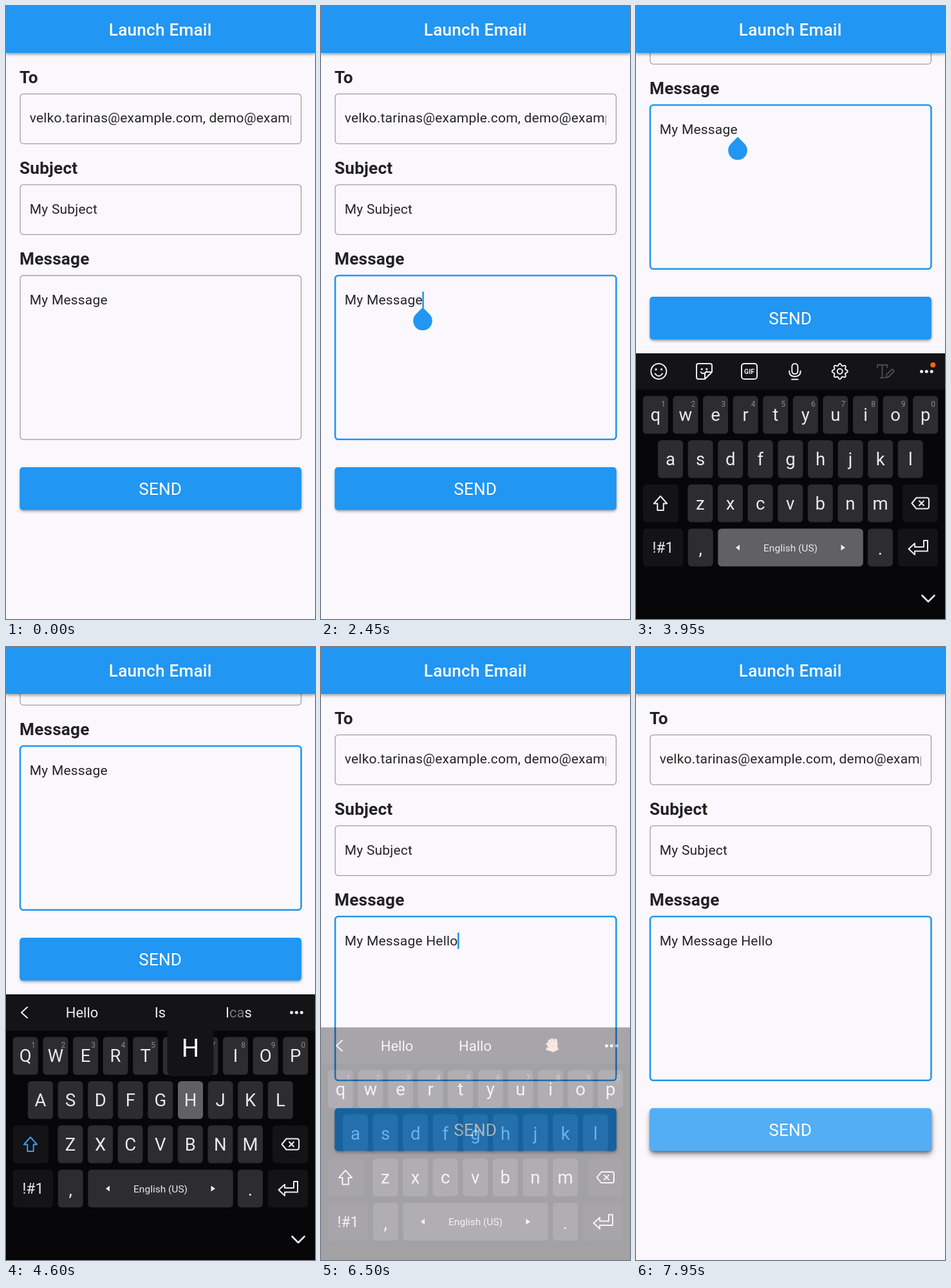
Animation of 480x953 px, one loop 8000 ms. Source, as an HTML page:

```html
<!DOCTYPE html>
<html lang="en">
<head>
<meta charset="utf-8">
<title>Launch Email</title>
<style>
  html, body { margin: 0; width: 100%; height: 100%; overflow: hidden; background: #faf8fc; }
  svg { display: block; width: 100%; height: 100%; font-family: Roboto, sans-serif; }
  text { white-space: pre; }
  .label { font-size: 26.2px; font-weight: 700; letter-spacing: .2px; fill: #222124; }
  .input { font-size: 21px; letter-spacing: .2px; fill: #252427; }
  .box { fill: none; stroke: #9f9da1; stroke-width: 1.3; }
  .icon { fill: none; stroke: #eee; stroke-width: 2; stroke-linecap: round; stroke-linejoin: round; }
  .solid { fill: #eee; stroke: none; }
  .mid { text-anchor: middle; }
</style>
</head>
<body>
<svg viewBox="0 0 480 953" preserveAspectRatio="none">
  <defs>
    <clipPath id="inputClip"><rect x="36" y="140" width="407" height="70"/></clipPath>
    <filter id="soft" x="-20%" y="-40%" width="140%" height="180%"><feGaussianBlur stdDeviation="2"/></filter>
    <filter id="softer" x="-20%" y="-60%" width="140%" height="220%"><feGaussianBlur stdDeviation="5"/></filter>
  </defs>
  <rect width="480" height="953" fill="#faf8fc"/>

  <g id="page">
    <text class="label" x="21" y="120">To</text>
    <rect class="box" x="22" y="136.6" width="436.5" height="77.5" rx="5"/>
    <text class="input" x="36.8" y="181.4" clip-path="url(#inputClip)">velko.tarinas@example.com, demo@example.com</text>
    <text class="label" x="21" y="261">Subject</text>
    <rect class="box" x="22" y="277.8" width="436.5" height="77.5" rx="5"/>
    <text class="input" x="36.8" y="322.6">My Subject</text>
    <text class="label" x="21" y="402.3">Message</text>
    <rect id="messageBox" class="box" x="22" y="419" width="436.5" height="254.8" rx="5"/>
    <text id="message" class="input" x="36.8" y="463.8"><tspan id="base"></tspan><tspan id="typed"></tspan></text>
    <rect id="caret" y="444" width="2.6" height="25.5" fill="#2196f3"/>
    <path id="handle" d="M158 468.5L168.5 479A14.8 14.8 0 1 1 147.5 479Z" fill="#2196f3"/>
    <rect id="lowShadow" x="22" y="719.5" width="437" height="66" rx="5" fill="#000" opacity=".38" filter="url(#soft)"/>
    <rect id="highShadow" x="22" y="723" width="437" height="66" rx="5" fill="#000" filter="url(#softer)"/>
    <rect x="21.3" y="717" width="437.6" height="66.6" rx="5" fill="#2196f3"/>
    <rect id="pressed" x="21.3" y="717" width="437.6" height="66.6" rx="5" fill="#fff"/>
    <text class="mid" x="239.7" y="760" font-size="26.2" letter-spacing=".2" fill="#fff">SEND</text>
  </g>

  <rect y="4" width="480" height="71.5" fill="#000" opacity=".34" filter="url(#soft)"/>
  <rect width="480" height="73" fill="#2196f3"/>
  <text class="mid" x="239.7" y="46" font-size="26.2" font-weight="500" letter-spacing=".2" fill="#fff">Launch Email</text>

  <g id="keyboard">
    <rect y="540" width="480" height="500" fill="#070609"/>
    <rect y="540" width="480" height="56.5" fill="#141316"/>
    <g id="tools" class="icon">
      <circle cx="35.3" cy="568" r="12"/>
      <path d="M29.5 571.5Q35.3 579 41.1 571.5"/>
      <path d="M97 556H115A3 3 0 0 1 118 559V569L107 580H97A3 3 0 0 1 94 577V559A3 3 0 0 1 97 556ZM118 569H110A3 3 0 0 0 107 572V580M100.5 569Q104 574 110 568"/>
      <rect x="164" y="556" width="24" height="24" rx="4"/>
      <text class="solid mid" x="176" y="572" font-size="10.5" font-weight="700">GIF</text>
      <rect x="242.3" y="556" width="9" height="16" rx="4.5"/>
      <path d="M238 567.5Q238 576 246.8 576T255.6 567.5M242 580.5H251.6"/>
      <path id="gear"/>
      <circle cx="316.7" cy="568" r="4"/>
      <path stroke="#4b4a4d" d="M375 562V558H390V562M382.5 558V578M379.5 578H385.5M388 578L389.5 573L398 564.5L401 567.5L392.5 576.5Z"/>
      <g class="solid">
        <circle cx="31" cy="565" r="1.7"/><circle cx="39.6" cy="565" r="1.7"/>
        <circle cx="102.3" cy="564.5" r="1.6"/><circle cx="109.8" cy="564.5" r="1.6"/>
      </g>
      <circle cx="461.3" cy="558" r="4" fill="#f2640c" stroke="none"/>
    </g>
    <g id="suggestions" fill="#f0f0f0" font-size="22">
      <path class="icon" d="M33 560L24 568.3L33 576.5"/>
      <text class="mid" x="118" y="576"></text>
      <text class="mid" x="239.5" y="576"></text>
      <text class="mid" x="361.5" y="576"></text>
      <g id="wave" transform="translate(361 569) rotate(-25)" fill="none" stroke-linecap="round">
        <path id="hand" d="M-5 0L-6.5 -7M-1.5 -2L-2 -10M2 -2L2.5 -10M5 0L7 -7M-4 5L-10 0M-3 2H3V6H-3Z"/>
        <use href="#hand" stroke="#d98472" stroke-width="5"/>
        <use href="#hand" stroke="#f7d5c1" stroke-width="3.3"/>
      </g>
    </g>
    <g class="solid"><circle cx="443.6" cy="568.3" r="2.5"/><circle cx="451.3" cy="568.3" r="2.5"/><circle cx="459.2" cy="568.3" r="2.5"/></g>
    <g id="keys"></g>
    <g class="icon">
      <path id="shift" d="M38 762L27.8 773.5H33.3V784H42.7V773.5H48.2Z"/>
      <path d="M435.5 764.5H452A3 3 0 0 1 455 767.5V778.5A3 3 0 0 1 452 781.5H435.5L428.5 773ZM440 769.5L447 776.5M447 769.5L440 776.5"/>
      <path d="M423.5 844L433 835.5V841H447V831H453V847.5H433V853Z"/>
      <path d="M444.5 916.5L454 926L463.5 916.5" stroke-width="2.6"/>
      <path class="solid" d="M155 842L161 837.5V846.5ZM325 842L318.5 837.5V846.5Z"/>
    </g>
    <g id="popup">
      <rect x="-36" y="-100" width="72" height="92.5" rx="9" fill="#141316"/>
      <text class="mid" y="-38" font-size="38.5" fill="#fff"></text>
    </g>
  </g>
</svg>
<script>
const LOOP = 8000;
const FOCUS = 2350, SPACE = 4050, CLOSE = 6400;
const KEYBOARD_IN = 2470, SCROLL = 2600, SEND = 7680;

const $ = id => document.getElementById(id);
const clamp = v => Math.max(0, Math.min(1, v));
const easeOut = p => 1 - (1 - p) ** 2;
const progress = (t, start, length) => easeOut(clamp((t - start) / length));
const show = (el, on) => el.setAttribute('display', on ? 'inline' : 'none');

function add(parent, tag, attrs, text = '') {
  const el = document.createElementNS('http://www.w3.org/2000/svg', tag);
  for (const name in attrs) el.setAttribute(name, attrs[name]);
  el.textContent = text;
  return parent.appendChild(el);
}

// Each typed letter lands when its key is released.
const strokes = [
  { key: ' ', down: 3900, up: SPACE },
  { key: 'h', down: 4560, up: 4700 },
  { key: 'e', down: 4850, up: 4950 },
  { key: 'l', down: 5000, up: 5080 },
  { key: 'l', down: 5130, up: 5210 },
  { key: 'o', down: 5270, up: 5350 },
];
const word = 'Hello';

const hints = [
  [SPACE, 'Hello', 'Is', 'Icas'],
  [4750, 'H', 'Hello', 'Hallo'],
  [5000, 'He', 'Hello', 'Heute'],
  [5130, 'Hel', 'Hello', 'Hell'],
  [5280, 'Hell', 'Hello', 'Helligkeit'],
  [5750, 'Hello', 'Hallo', ''],
];

const keys = {};
const PITCH = 46.6;

function addKey(id, x, y, width, label, style = {}) {
  const face = add($('keys'), 'rect', { x, y, width, height: 58.8, rx: 5.5, fill: style.fill || '#2d2c2f' });
  const text = add($('keys'), 'text', {
    class: 'mid', x: x + width / 2, y: y + (style.base || 39),
    'font-size': style.size || 27.5, fill: '#e9e9ea'
  }, label);
  keys[id] = { face, text, x: x + width / 2, y, fill: style.fill || '#2d2c2f' };
}

[['qwertyuiop', 10.8, 606.2], ['asdfghjkl', 34, 675], ['zxcvbnm', 80.4, 743.7]].forEach(([row, left, y], r) => {
  [...row].forEach((letter, i) => {
    addKey(letter, left + i * PITCH, y, 39, letter);
    if (r === 0) {
      add($('keys'), 'text', { class: 'mid', x: left + i * PITCH + 31.5, y: 622.5, 'font-size': 12, fill: '#89888b' }, (i + 1) % 10);
    }
  });
});
const dark = '#141316';
addKey('shift', 10.8, 743.7, 55.2, '', { fill: dark });
addKey('back', 414, 743.7, 55, '', { fill: dark });
addKey('symbols', 10.8, 812.4, 62.2, '!#1', { fill: dark, size: 23, base: 38 });
addKey(',', 80.7, 812.4, 39, ',', { base: 41 });
addKey(' ', 127.3, 812.4, 225.5, 'English (US)', { size: 15.5, base: 35.5 });
addKey('.', 360, 812.4, 39, '.', { base: 41 });
addKey('enter', 406.8, 812.4, 62.2, '', { fill: dark });

const gear = Array.from({ length: 97 }, (_, i) => {
  const a = i * Math.PI / 48, r = 10.6 + 1.5 * Math.cos(8 * a);
  return (316.7 + r * Math.cos(a)).toFixed(2) + ' ' + (568 + r * Math.sin(a)).toFixed(2);
});
$('gear').setAttribute('d', 'M' + gear.join('L') + 'Z');

function drawMessage(t) {
  const focused = t >= FOCUS;
  $('messageBox').style.stroke = focused ? '#2196f3' : '';
  $('messageBox').style.strokeWidth = focused ? 2.6 : '';

  const landed = strokes.filter(s => t >= s.up);
  $('base').textContent = 'My Message' + (landed.length ? '\u00a0' : '');
  $('typed').textContent = word.slice(0, Math.max(0, landed.length - 1));
  $('typed').style.textDecoration = t < CLOSE ? 'underline' : 'none';

  const lastEdit = landed.length ? landed[landed.length - 1].up : FOCUS;
  show($('caret'), focused && Math.floor((t - lastEdit) / 500) % 2 === 0);
  $('caret').setAttribute('x', 36.3 + $('message').getComputedTextLength());
  show($('handle'), focused && t < SPACE);
}

function drawKeyboard(t) {
  const up = t < CLOSE ? progress(t, KEYBOARD_IN, 250) : 1 - progress(t, CLOSE, 250);
  show($('keyboard'), up > 0);
  $('keyboard').setAttribute('opacity', up);
  $('keyboard').setAttribute('transform', `translate(0 ${80 * (1 - up)})`);

  const caps = t >= SPACE && t < 4700;
  const stroke = strokes.find(s => t >= s.down && t < s.up);
  for (const id in keys) {
    const { face, text, fill } = keys[id];
    face.setAttribute('fill', stroke && stroke.key === id ? '#616063' : fill);
    if (/^[a-z]$/.test(id)) text.textContent = caps ? id.toUpperCase() : id;
  }
  $('shift').style.stroke = caps ? '#3d9bf0' : '';

  const popped = stroke && stroke.key !== ' ';
  show($('popup'), popped);
  if (popped) {
    const key = keys[stroke.key];
    $('popup').setAttribute('transform', `translate(${key.x} ${key.y})`);
    $('popup').lastElementChild.textContent = caps ? stroke.key.toUpperCase() : stroke.key;
  }

  const hint = hints.filter(h => t >= h[0]).pop();
  show($('tools'), !hint);
  show($('suggestions'), hint);
  if (!hint) return;
  const slots = $('suggestions').querySelectorAll('text');
  slots.forEach((slot, i) => {
    slot.textContent = '';
    // The middle letters of this hint are still fading in.
    for (const ch of hint[i + 1]) {
      add(slot, 'tspan', { fill: hint[3] === 'Icas' && 'ca'.includes(ch) ? '#77767a' : '#f0f0f0' }, ch);
    }
  });
  show($('wave'), !hint[3]);
}

function draw(t) {
  const scroll = t < CLOSE ? 265 * progress(t, SCROLL, 130) : 0;
  $('page').setAttribute('transform', `translate(0 ${-scroll})`);
  drawMessage(t);
  drawKeyboard(t);
  const press = progress(t, SEND, 200);
  $('pressed').setAttribute('opacity', .225 * press);
  $('highShadow').setAttribute('opacity', .38 * press);
}

const start = performance.now();
function tick() {
  draw((performance.now() - start) % LOOP);
  requestAnimationFrame(tick);
}
tick();
</script>
</body>
</html>
```
